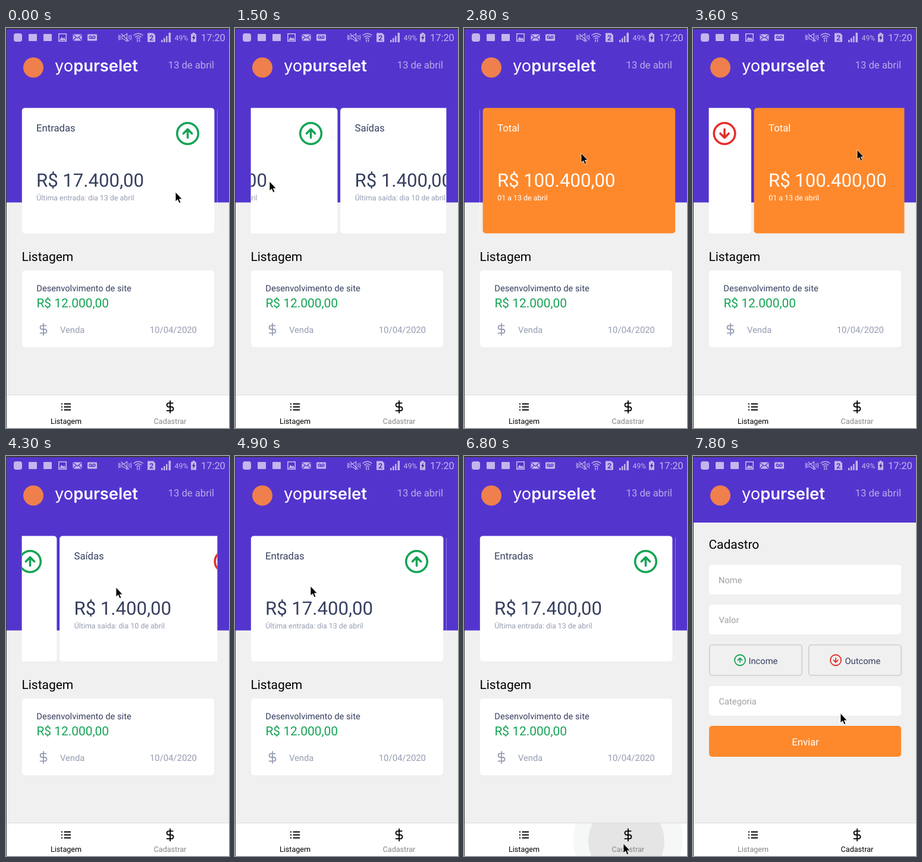
An HTML page for the animation above (8 s loop, 375 px wide and 673 px high).

```html
<!DOCTYPE html>
<html lang="pt-BR">
<head>
<meta charset="utf-8">
<title>Finanças</title>
<style>
  html, body { margin: 0; width: 100%; height: 100%; overflow: hidden; background: #f0f0f0; }
  svg { display: block; width: 375px; height: 673px; font-family: Roboto, sans-serif; text-rendering: geometricPrecision; }
  .line { fill: none; stroke: currentColor; stroke-width: 2; stroke-linecap: round; stroke-linejoin: round; }
  .label { font-size: 16.7px; }
  .amount { font-size: 31.1px; }
  .note { font-size: 12.4px; }
  .title { font-size: 21px; fill: #000; }
  .body { font-size: 14.7px; }
  .tab { font-size: 12.6px; text-anchor: middle; }
  .ink { fill: #363f5f; }
  .soft { fill: #969cb2; }
  .hint { fill: #a0a0a0; }
  .white { fill: #fff; }
  .orange { fill: #fe892c; }
  .green { color: #12a454; }
  .red { color: #e52e2a; }
  .brand { font-family: Inter, "Open Sans", sans-serif; font-size: 27.3px; fill: #fff; }
</style>
</head>
<body>
<svg viewBox="0 0 375 673">
  <defs>
    <g id="up" class="line">
      <circle r="10"/><path d="M4 0L0-4L-4 0M0 4V-4"/>
    </g>
    <g id="down" class="line">
      <circle r="10"/><path d="M-4 0L0 4L4 0M0-4V4"/>
    </g>
    <path id="dollar" class="line" d="M0-11V11M5-7H-2.5a3.5 3.5 0 0 0 0 7h5a3.5 3.5 0 0 1 0 7H-6"/>
    <rect id="panel" x="-.4" y="-.4" width="323.8" height="210.8" rx="5"/>
    <clipPath id="window"><path d="M26.600 130H355.400V350H26.600Z"/></clipPath>
    <clipPath id="bar"><path d="M0 618H375V673H0Z"/></clipPath>
  </defs>

  <rect width="375" height="673" fill="#f0f0f0"/>
  <rect id="header" width="375" height="293.500" fill="#5335ce"/>

  <!-- status bar -->
  <g fill="#c2b6ec" color="#c2b6ec">
    <rect x="13" y="9" width="14" height="14" rx="4"/>
    <rect x="38" y="10" width="14" height="12" rx="1"/>
    <rect x="63" y="10" width="14" height="12" rx="1"/>
    <rect x="88.800" y="9.800" width="12.400" height="12.400" fill="none" stroke="currentColor" stroke-width="1.600"/>
    <path d="M90 20.500L93.500 15L96 18L98 16L100.500 20.500Z"/>
    <rect x="112.500" y="10.500" width="15" height="11" rx="1"/>
    <rect x="137" y="10.500" width="16" height="11" rx="1"/>
    <g fill="none" stroke="#5335ce" stroke-width="1.300">
      <path d="M113 11.500L120 17L127 11.500M113 21L117.500 16M127 21L122.500 16"/>
      <circle cx="142" cy="15.500" r="2"/><circle cx="148" cy="15.500" r="2"/><path d="M142 17.500H148"/>
    </g>
    <g fill="none" stroke="currentColor" stroke-width="1.200">
      <path d="M195 13.500H198L203.500 9.500V22.500L198 18.500H195Z"/>
      <path d="M193.500 9.500L207 22.500"/>
      <path d="M189 11.500L190.500 13.500L189 16L190.500 18.500L189 20.500M192 12V20M207 12V19M211 11.500L209.500 13.500L211 16L209.500 18.500L211 20.500"/>
    </g>
    <g fill="none" stroke="currentColor" stroke-width="1.400">
      <path d="M214.500 12.500Q222.500 6 230.500 12.500M217 15.500Q222.500 11 228 15.500M219.500 18Q222.500 15.500 225.500 18"/>
      <path d="M221 19V23.500M224.500 19V23.500"/>
    </g>
    <path d="M238 8.500H247.500L251 12V23.500H238Z"/>
    <path d="M261 20H263.500V24H261ZM265 17H267.500V24H265ZM269 13.500H271.500V24H269ZM273.500 8H277V24H273.500Z"/>
    <path d="M313.500 8H317.500V10H320V23.500H311V10H313.500Z"/>
    <path d="M317 11L313 17H315.500L314 22L318.500 15.500H316Z" fill="#35248c"/>
    <text x="283.500" y="20.500" font-size="12.300">49%</text>
    <text x="328" y="22" font-size="16.400">17:20</text>
    <text x="244.500" y="20.500" font-size="12.500" font-weight="700" text-anchor="middle" style="fill:#5335ce">2</text>
  </g>

  <circle cx="46" cy="66.500" r="17" fill="#ef7f4d"/>
  <text class="brand" x="82" y="73">yo<tspan font-weight="600">purselet</tspan></text>
  <text class="label" x="272.500" y="68" fill="#b9aae9">13 de abril</text>

  <!-- list page -->
  <g id="list">
    <g clip-path="url(#window)">
      <g id="cards">
        <g transform="translate(27 135)">
          <use href="#panel" class="white"/>
          <text class="label ink" x="24" y="39">Entradas</text>
          <text class="amount ink" x="24" y="132">R$ 17.400,00</text>
          <text class="note soft" x="24.300" y="155">Última entrada: dia 13 de abril</text>
          <use href="#up" class="green" transform="translate(278.500 42.500) scale(1.78)"/>
        </g>
        <g transform="translate(355.500 135)">
          <use href="#panel" class="white"/>
          <text class="label ink" x="24" y="39">Saídas</text>
          <text class="amount ink" x="24" y="132">R$ 1.400,00</text>
          <text class="note soft" x="24.300" y="155">Última saída: dia 10 de abril</text>
          <use href="#down" class="red" transform="translate(278.500 42.500) scale(1.78)"/>
        </g>
        <g transform="translate(684 135)">
          <use href="#panel" class="orange"/>
          <text class="label white" x="24" y="39">Total</text>
          <text class="amount white" x="24" y="132">R$ 100.400,00</text>
          <text class="note white" x="24.300" y="155">01 a 13 de abril</text>
        </g>
      </g>
    </g>
    <text class="title" x="26.400" y="391.500">Listagem</text>
    <rect class="white" x="27" y="408" width="323" height="129" rx="5"/>
    <text class="body ink" x="51.300" y="443">Desenvolvimento de site</text>
    <text x="51.400" y="470" font-size="20.900" fill="#12a454">R$ 12.000,00</text>
    <use href="#dollar" color="#969cb2" transform="translate(63 507) scale(.9)"/>
    <text class="body soft" x="91" y="512.500">Venda</text>
    <text class="soft" x="321" y="512.500" font-size="14.900" text-anchor="end">10/04/2020</text>
  </g>

  <!-- form page -->
  <g id="form">
    <text class="title" x="26.400" y="155.500">Cadastro</text>
    <g class="white">
      <rect x="27" y="183" width="323" height="50" rx="5"/>
      <rect x="27" y="250" width="323" height="50" rx="5"/>
      <rect x="27" y="387" width="323" height="50" rx="5"/>
    </g>
    <g class="body hint">
      <text x="43" y="214">Nome</text>
      <text x="43.500" y="281">Valor</text>
      <text x="43.500" y="417.500">Categoria</text>
    </g>
    <g fill="none" stroke="#cecece" stroke-width="1.600">
      <rect x="27.800" y="317.800" width="155.400" height="51.400" rx="4.500"/>
      <rect x="194.800" y="317.800" width="155.400" height="51.400" rx="4.500"/>
    </g>
    <use href="#up" class="green" transform="translate(79 343.500) scale(.9)"/>
    <use href="#down" class="red" transform="translate(240 343.500) scale(.9)"/>
    <text class="body ink" x="93.500" y="349.500">Income</text>
    <text class="body ink" x="255.500" y="349.500">Outcome</text>
    <rect class="orange" x="27" y="454" width="323" height="52" rx="5"/>
    <text class="label white" x="189" y="487" text-anchor="middle">Enviar</text>
  </g>

  <!-- tab bar -->
  <rect y="617" width="375" height="56" fill="#fff"/>
  <rect y="617" width="375" height="1" fill="#dcdcdc"/>
  <g id="ripple" clip-path="url(#bar)">
    <circle id="halo" cx="276" cy="645" fill="#f6f8f8"/>
    <circle id="press" cx="273" cy="648" fill="#e5e5e5"/>
  </g>
  <path d="M93 632.500H95M93 637.500H95M93 642.500H95M97.500 632.500H109M97.500 637.500H109M97.500 642.500H109" stroke="#000" stroke-width="2"/>
  <use href="#dollar" color="#000" transform="translate(276 637.500) scale(.92)"/>
  <text id="tabList" class="tab" x="101" y="665.500">Listagem</text>
  <text id="tabForm" class="tab" x="276" y="665.500">Cadastrar</text>

  <path d="M0 0H375V2H1V673H0Z" fill="#3a3a3e"/>
  <path id="cursor" d="M0 0V16L3.700 12.800L6.200 18.700L8.800 17.500L6.300 11.900H11.200Z" fill="#000" stroke="#fff" stroke-width=".8"/>
</svg>
<script>
  const LOOP = 8000, STEP = 100, TAP = 6600, SWITCH = 7000;
  const $ = id => document.getElementById(id);
  const ease = {
    lin: p => p,
    soft: p => p * p * (3 - 2 * p),
    out: p => 1 - (1 - p) ** 3
  };

  // time, easing into this row, values
  const scroll = [
    [0, 'lin', 0], [500, 'lin', 0],
    [1500, 'soft', 178], [1800, 'out', 330],
    [2200, 'soft', 560], [2600, 'out', 652],
    [3200, 'lin', 652], [3600, 'soft', 581],
    [3800, 'lin', 531], [4100, 'out', 380],
    [4500, 'soft', 150], [4900, 'out', 0]
  ];
  const pointer = [
    [0, 'lin', 285, 276], [100, 'lin', 294, 274], [300, 'lin', 294, 274],
    [500, 'soft', 236, 262], [1500, 'soft', 58, 258],
    [1800, 'soft', 290, 232], [2200, 'soft', 60, 220],
    [2900, 'soft', 205, 210], [3200, 'lin', 205, 208],
    [3600, 'soft', 276, 205], [3800, 'lin', 326, 208],
    [4100, 'soft', 70, 220], [4500, 'soft', 300, 222],
    [4900, 'soft', 127, 219], [5400, 'lin', 127, 219],
    [6500, 'soft', 268, 652], [7200, 'lin', 268, 652],
    [7800, 'soft', 248, 433]
  ];

  function sample(rows, t) {
    const i = rows.findIndex(r => r[0] > t);
    if (i < 0) return rows[rows.length - 1].slice(2);
    const a = rows[i - 1], b = rows[i];
    const p = ease[b[1]]((t - a[0]) / (b[0] - a[0]));
    return a.slice(2).map((v, k) => v + (b[k + 2] - v) * p);
  }

  const show = (id, on) => $(id).setAttribute('display', on ? 'inline' : 'none');
  const move = (id, x, y) => $(id).setAttribute('transform', `translate(${x} ${y})`);
  const clamp = v => Math.max(0, Math.min(1, v));

  function draw(t) {
    const form = t >= SWITCH;
    show('list', !form);
    show('form', form);
    $('header').setAttribute('height', form ? 112 : 293.5);
    $('tabList').setAttribute('fill', form ? '#858585' : '#000');
    $('tabForm').setAttribute('fill', form ? '#000' : '#858585');

    move('cards', -sample(scroll, t)[0], 0);
    move('cursor', ...sample(pointer, t));

    const age = t - TAP;
    show('ripple', age > 0 && age < 800);
    $('press').setAttribute('r', 64 * clamp(age / 200) + 28 * clamp((age - 200) / 300));
    $('halo').setAttribute('r', 60 + 32 * clamp(age / 200));
    $('ripple').setAttribute('opacity', 1 - clamp((age - 300) / 500));
  }

  const start = performance.now();
  function tick() {
    const t = (performance.now() - start) % LOOP;
    draw(Math.floor(t / STEP) * STEP);
    requestAnimationFrame(tick);
  }
  tick();
</script>
</body>
</html>
```
